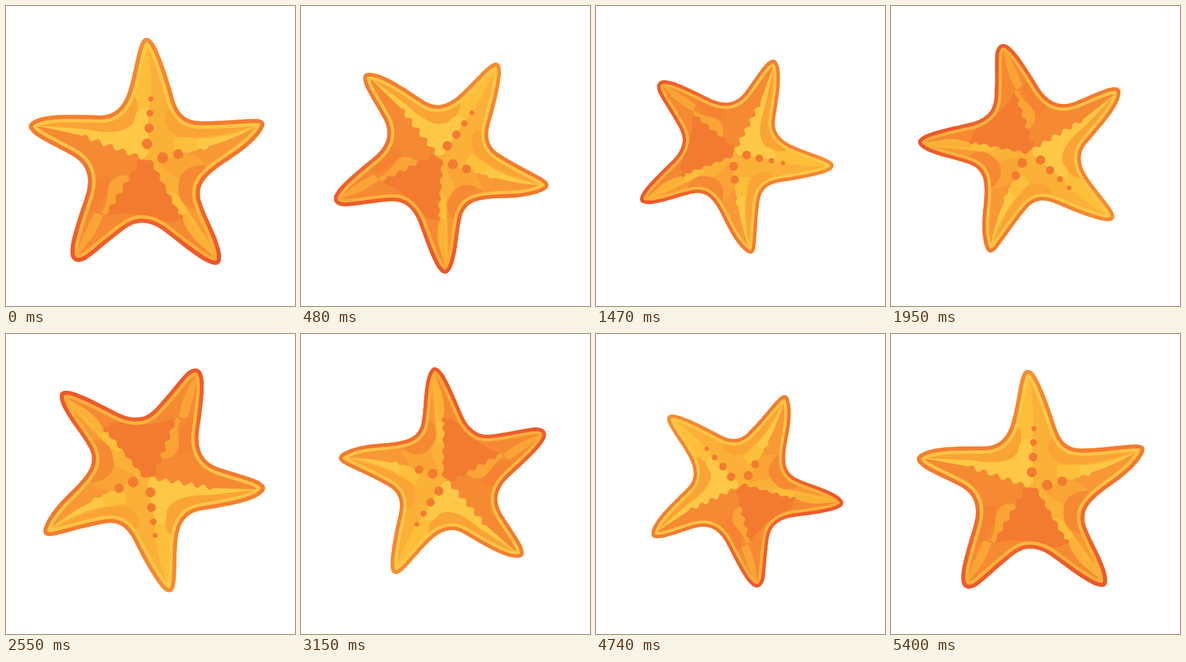
Write an HTML page without scripts that moves like this. It is 500 px wide and 518 px high and loops after 5.43 s.

```html
<!DOCTYPE html>
<html lang="en">
<head>
<meta charset="utf-8">
<title>Starfish</title>
<style>
  html, body { margin: 0; height: 100%; overflow: hidden; background: #fff; }
  svg { display: block; width: 100vw; height: 100vh; }

  .star {
    transform-box: view-box;
    transform-origin: 245.3px 256.4px;
    animation: spin 5430ms steps(181) infinite, pulse 5430ms infinite;
  }

  @keyframes spin {
    from { rotate: 0deg; }
    to { rotate: 360deg; }
  }

  /* 181 ticks of 30 ms: turning points at ticks 39, 90 and 137 */
  @keyframes pulse {
    0% { scale: 1; animation-timing-function: steps(39); }
    21.547% { scale: .792; animation-timing-function: steps(51); }
    49.724% { scale: .978; animation-timing-function: steps(47); }
    75.691% { scale: .69; animation-timing-function: steps(44); }
    100% { scale: .974; }
  }

  .rim, .edge { fill: none; }
  .rim { stroke: url(#rim); stroke-width: 26; }
  .edge { stroke: url(#edge); stroke-width: 14; }
  .sun { fill: #fec846; }
  .gold { fill: #fdbe3a; }
  .amber { fill: #fbb037; }
  .honey { fill: #faa436; }
  .peach { fill: #f89935; }
  .orange { fill: #f68a33; }
  .deep { fill: #f37b30; }
</style>
</head>
<body>
<svg viewBox="0 0 500 518" preserveAspectRatio="none">
  <defs>
    <path id="body" d="M243 55C251 55 258 66 266 86C276 110 284 138 290 159C296 180 306 198 334 199C370 200 410 195 430 195C445 195 450 201 445 211C437 226 420 242 400 256C380 270 362 280 348 295C338 305 333 318 336 333C341 352 353 374 362 396C370 416 374 431 371 441C368 449 359 448 347 442C324 430 294 404 271 387C257 377 245 374 233 374C215 375 202 388 186 400C168 414 152 429 138 438C124 445 115 442 112 430C110 412 118 388 126 363C133 340 142 322 142 303C142 282 132 269 116 259C95 247 65 233 51 223C40 214 36 207 43 201C56 190 85 188 110 188C135 188 150 189 165 189C190 188 203 172 211 149C219 125 223 98 229 76C233 62 237 55 243 55Z"/>
    <clipPath id="cut"><use href="#body"/></clipPath>
    <linearGradient id="edge" gradientUnits="userSpaceOnUse" x1="220" y1="55" x2="250" y2="446">
      <stop offset="0" stop-color="#f78d33"/>
      <stop offset=".45" stop-color="#f37a31"/>
      <stop offset="1" stop-color="#ee552d"/>
    </linearGradient>
    <linearGradient id="rim" gradientUnits="userSpaceOnUse" x1="230" y1="60" x2="250" y2="440">
      <stop offset="0" stop-color="#fec948"/>
      <stop offset=".5" stop-color="#fec245"/>
      <stop offset="1" stop-color="#fbab38"/>
    </linearGradient>
  </defs>

  <g class="star">
    <g clip-path="url(#cut)">
      <path class="amber" d="M0 0H500V518H0Z"/>

      <!-- top arm -->
      <path class="gold" d="M244 60C251 100 253 140 248 185L215 190L200 170Z"/>

      <!-- right arm -->
      <path class="honey" d="M275 186C272 205 284 220 304 226C345 230 400 218 440 203L400 180L290 170Z"/>
      <path class="peach" d="M440 205L350 240Q330 250 304 254L316 290L300 330L400 480L480 260Z"/>
      <path class="sun" d="M440 204C400 221 365 229 329 229L331 247q-3-5-8 2t-8 2L329 250q6-7 11-3t11-5C375 235 410 222 440 204Z"/>
      <path class="gold" d="M290 227H330L331 247q-6-3-10 3t-10 3L290 249Z"/>
      <path class="honey" d="M303 254Q325 252 345 274L300 300L262 272Z"/>

      <!-- left arm -->
      <path class="honey" d="M48 206L160 180L214 154C229 153 231 178 224 198C212 222 172 218 140 214Z"/>
      <path class="sun" d="M50 206L140 213C178 222 212 219 222 198C224 180 233 176 246 178L246 255L238 264L200 262L120 230Z"/>
      <path class="orange" d="M50 206L132 224q8-5 10.800 4t10.800 4 10.800 4 10.800 4 10.800 4 10.800 4 10.800 4 10.800 4 10.800 4 10.800 4L250 280L235 390L60 460Z"/>

      <!-- lower right arm -->
      <path class="orange" d="M299 325C294 290 310 274 345 275L350 345L322 350C310 345 302 336 299 325Z"/>
      <path class="orange" d="M250 270L300 360L364 438L340 450L230 390Z"/>
      <path class="gold" d="M278 322C290 318 298 327 303 337L364 437L307 368L303 365L284 335Z"/>
      <path class="amber" d="M312 357L364 437L328 405C315 390 308 378 305 364Z"/>

      <!-- lower left arm -->
      <path class="deep" d="M150 296L180 294C176 318 170 342 152 358L138 350Z" opacity=".45"/>
      <path class="honey" d="M178 310C184 296 196 291 211 293L214 305L186 343L172 362L166 356C176 342 175 326 178 310Z"/>
      <path class="deep" d="M232 266H250q7 3 5.300 9.900t5.300 9.900 5.300 9.900 5.300 9.900 5.300 9.900 5.300 9.900 5.300 9.900 5.300 9.900 5.300 9.900 5.300 9.900L288 374L235 364L190 376L172 362q8-1 6-9.600t6-9.600 6-9.600 6-9.600 6-9.600 6-9.600 6-9.600 6-9.600 6-9.600 6-9.600Z"/>
      <path class="orange" d="M172 362L200 358L235 360L200 400L118 434Z"/>
      <path class="honey" d="M118 434C128 408 140 380 154 357L168 361C160 385 142 414 118 434Z"/>

      <g class="deep">
        <circle cx="250.500" cy="160.500" r="4.500"/>
        <circle cx="249" cy="185" r="6"/>
        <circle cx="247.500" cy="211" r="8"/>
        <circle cx="244" cy="238" r="9"/>
        <circle cx="271" cy="262" r="9.500"/>
        <circle cx="298" cy="256" r="8.500"/>
        <circle cx="302" cy="364" r="4.500"/>
      </g>

      <use href="#body" class="rim"/>
      <use href="#body" class="edge"/>
    </g>
  </g>
</svg>
</body>
</html>
```
